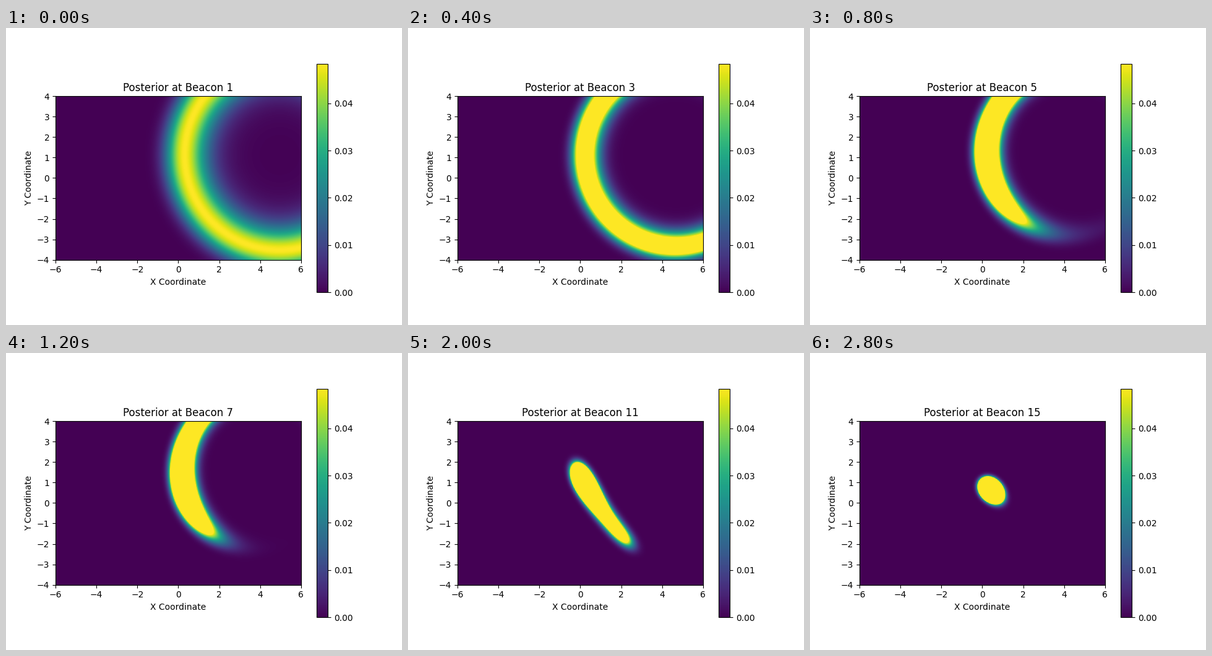
Recreate the animation shown at these times as a matplotlib script. Size 640x480 px, loop 3 s.

```python
import numpy as np
import matplotlib.pyplot as plt
from matplotlib.animation import FuncAnimation

PEAK = 0.0484   # top of the colour scale
SIGMA = 6.6     # spread of a squared range reading
STEP = 0.05

# stops along the way: readings taken there, x, y, measured range
STOPS = [
    (1, 4.95, 1.13, 4.64),
    (3, 4.52, 1.12, 4.37),
    (3, 3.50, 2.40, 3.62),
    (2, 2.80, 1.10, 2.53),
    (3, -5.0, -5.0, 7.92),
    (3, 3.50, -5.5, 6.82),
]
BEACONS = [(x, y, r) for count, x, y, r in STOPS for _ in range(count)]

X, Y = np.meshgrid(np.arange(-6, 6, STEP) + STEP / 2,
                   np.arange(-4, 4, STEP) + STEP / 2)


def misfit(x, y, r):
    """Error of the squared distance to a beacon, in sigmas."""
    return ((X - x) ** 2 + (Y - y) ** 2 - r * r) / SIGMA


def posterior(n):
    """Normalised belief after the first n beacons."""
    q = sum(misfit(*b) ** 2 for b in BEACONS[:n])
    p = np.exp((q.min() - q) / 2)
    return p / p.sum()


first = posterior(1)
scale = PEAK / first.max()

fig, ax = plt.subplots(figsize=(6.4, 4.8), dpi=100)
image = ax.imshow(first * scale, extent=(-6, 6, -4, 4), origin="lower",
                  cmap="viridis", vmin=0, vmax=PEAK)
fig.colorbar(image)
ax.set_xlabel("X Coordinate")
ax.set_ylabel("Y Coordinate")
title = ax.set_title("Posterior at Beacon 1")


def update(i):
    image.set_data(posterior(i + 1) * scale)
    title.set_text(f"Posterior at Beacon {i + 1}")
    return image, title


anim = FuncAnimation(fig, update, frames=len(BEACONS), interval=200,
                     repeat=True)
plt.show()
```
